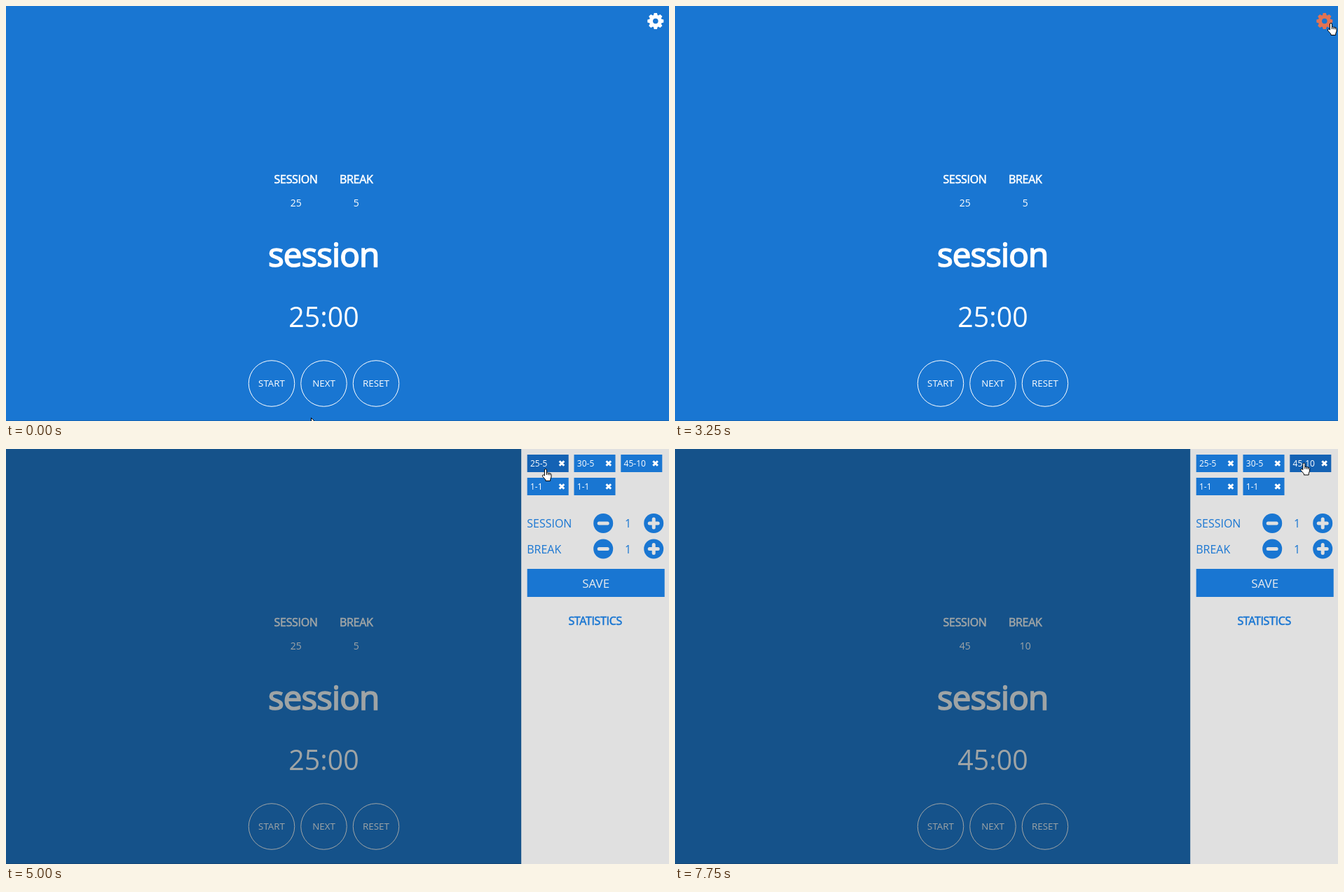
Recreate the animation shown at these times as an HTML page. Size 946 by 592 pixels, loop 8000 ms.

```html
<!DOCTYPE html>
<html lang="en">
<head>
<meta charset="utf-8">
<title>Session timer</title>
<style>
  html, body { margin: 0; width: 100%; height: 100%; overflow: hidden; background: #1976d2; }
  svg { display: block; font-family: "Open Sans", sans-serif; font-size: 16px; }
  .mid { text-anchor: middle; }
  .bold { letter-spacing: -.02em; stroke: currentColor; stroke-width: .036em; }
  .white { fill: #fff; color: #fff; }
  .blue { fill: #1976d2; color: #1976d2; }
  .small { font-size: 13.33px; }
  .value { font-size: 14px; }
  .ring { fill: #1976d2; stroke: #fff; stroke-width: 1; }
  .chip text { font-size: 12px; fill: #fff; }
  .cross { stroke: #fff; stroke-width: 3; }
  .sign { stroke: #e0e0e0; stroke-width: 5; stroke-linecap: round; }
  .cursor { fill: #fff; stroke: #000; stroke-width: 1; stroke-linejoin: round; }
</style>
</head>
<body>
<svg width="946" height="592" viewBox="0 0 946 592">
  <rect width="946" height="592" fill="#1976d2"/>
  <g id="gear" fill="#fff" transform="translate(926.8 21.5)">
    <circle r="9"/>
    <g id="teeth"></g>
    <circle class="blue" r="3.8"/>
  </g>
  <g class="white mid">
    <text class="bold" x="413.6" y="253">SESSION</text>
    <text class="bold" x="499.7" y="253">BREAK</text>
    <text class="value" id="work" x="413.7" y="286"></text>
    <text class="value" id="rest" x="499.7" y="286"></text>
    <text class="bold" x="453.2" y="372" font-size="47.6">session</text>
    <text id="clock" x="453.5" y="458" font-size="39.3"></text>
  </g>
  <g id="buttons"></g>
  <rect y="591" width="946" height="1" fill-opacity=".15"/>
  <rect id="shade" width="946" height="592" fill="#101c1e"/>
  <g id="panel">
    <rect width="212" height="592" fill="#e0e0e0"/>
    <g id="chips"></g>
    <g id="steppers"></g>
    <rect class="blue" x="8.5" y="171" width="196" height="40"/>
    <text class="mid" x="106.5" y="197.5" font-size="17" fill="#e8ebee">SAVE</text>
    <text class="blue bold mid" x="105.5" y="251.3">STATISTICS</text>
  </g>
  <path id="arrow" class="cursor" d="M.5.5v13.2l3-2.8 2.2 5 2.2-1-2.1-4.8h4z"/>
  <g id="hand" class="cursor">
    <path d="M-1.6 10V2a1.5 1.5 0 0 1 3 0v4.2c.6-.6 2-.5 2.4.3.7-.5 1.9-.3 2.2.5.9-.3 2 .3 2 1.4v3.6l-1.3 3.3v2.2H-.1v-1.6l-4.2-4.7c-1-1.6.6-2.8 1.7-2z"/>
    <path d="M1.4 6v3M3.8 6.5v2.7M6 7v2.4"/>
  </g>
</svg>
<script>
const LOOP = 8000, STEP = 250, FADE = 500, OPEN = 3250;
const $ = id => document.getElementById(id);
const repeat = (list, fn) => list.map(fn).join('');

$('teeth').innerHTML = repeat([...Array(8).keys()], i =>
  `<path transform="rotate(${i * 45})" d="M-3-8l.9-3.5h4.2L3-8z"/>`);

$('buttons').innerHTML = repeat(['START', 'NEXT', 'RESET'], (name, i) => {
  const x = 379 + i * 74.5;
  return `<circle class="ring" cx="${x}" cy="538.5" r="32.75"/>
    <text class="white small mid" x="${x}" y="543.3">${name}</text>`;
});

$('chips').innerHTML = repeat(['25-5', '30-5', '45-10', '1-1', '1-1'], (name, i) =>
  `<g class="chip" transform="translate(${8.5 + i % 3 * 66.8} ${i < 3 ? 8 : 41})">
    <rect class="blue" width="59" height="25"/>
    <text x="4.3" y="16.7">${name}</text>
    <path class="cross" d="M46 9.2l6.6 6.6m0-6.6l-6.6 6.6"/>
  </g>`);

$('steppers').innerHTML = repeat(['SESSION', 'BREAK'], (name, i) =>
  `<g class="blue" transform="translate(0 ${i * 36.5})">
    <text x="8" y="112.3">${name}</text>
    <text class="mid" x="152.5" y="112.3">1</text>
    <circle cx="117" cy="106" r="14"/><circle cx="189" cy="106" r="14"/>
    <path class="sign" d="M111 106h12M183 106h12M189 100v12"/>
  </g>`);

// Places the pointer visits; it eases from one to the next.
const BLUE = [25, 118, 210], WHITE = [255, 255, 255], NAVY = [15, 77, 150];
const chipRects = document.querySelectorAll('.chip rect');
const chipStop = (i, preset, arrive, leave, x, y) =>
  ({ arrive, leave, x, y, preset, el: chipRects[i], from: BLUE, to: NAVY });
const stops = [
  { arrive: 750, leave: 1500, x: 386, y: 548, el: document.querySelector('.ring'), from: BLUE, to: [21, 98, 176] },
  { arrive: 3000, leave: 4000, x: 936, y: 24, bow: -400, el: $('gear'), from: WHITE, to: [226, 115, 83] },
  chipStop(0, [25, 5], 5000, 5500, 770, 28),
  chipStop(1, [30, 5], 6250, 7000, 824.5, 28),
  chipStop(2, [45, 10], 7750, LOOP, 897.5, 19.5)
];

const ramp = (t, start, span) => Math.min(1, Math.max(0, (t - start) / span));
const smooth = p => p * p * (3 - 2 * p);
const lerp = (a, b, p) => a + (b - a) * p;
const mix = (a, b, p) => `rgb(${a.map((v, i) => Math.round(lerp(v, b[i], p)))})`;

function pointer(t) {
  let pos = { leave: 0, x: 435, y: 587 };
  for (const stop of stops) {
    if (t < pos.leave) break;
    const p = smooth(ramp(t, pos.leave, stop.arrive - pos.leave));
    const bow = (stop.bow || 0) * p * (1 - p) ** 2;
    pos = { leave: stop.leave, x: lerp(pos.x, stop.x, p), y: lerp(pos.y, stop.y, p) + bow };
    if (p < 1) break;
  }
  return pos;
}

function draw(t) {
  let preset = [25, 5], over = false;
  for (const { arrive, leave, el, from, to, preset: picked } of stops) {
    const enter = arrive - STEP, exit = leave + STEP;
    el.style.fill = mix(from, to, ramp(t, enter, FADE) - ramp(t, exit, FADE));
    over = over || t >= enter && t < exit;
    if (picked && t >= arrive) preset = picked;
  }
  $('work').textContent = preset[0];
  $('rest').textContent = preset[1];
  $('clock').textContent = preset[0] + ':00';

  const open = 1 - (1 - ramp(t, OPEN, FADE)) ** 1.23;
  $('shade').setAttribute('opacity', .4 * open);
  $('panel').setAttribute('transform', `translate(${lerp(946, 735.2, open)})`);

  const { x, y } = pointer(t);
  for (const id of ['arrow', 'hand']) {
    $(id).setAttribute('transform', `translate(${x} ${y})`);
    $(id).style.display = (id === 'hand') === over ? '' : 'none';
  }
}

// The screen refreshes four times a second.
const begin = performance.now();
let last = -1;
function tick() {
  const t = Math.floor((performance.now() - begin) % LOOP / STEP) * STEP;
  if (t !== last) draw(last = t);
  requestAnimationFrame(tick);
}
tick();
</script>
</body>
</html>
```
